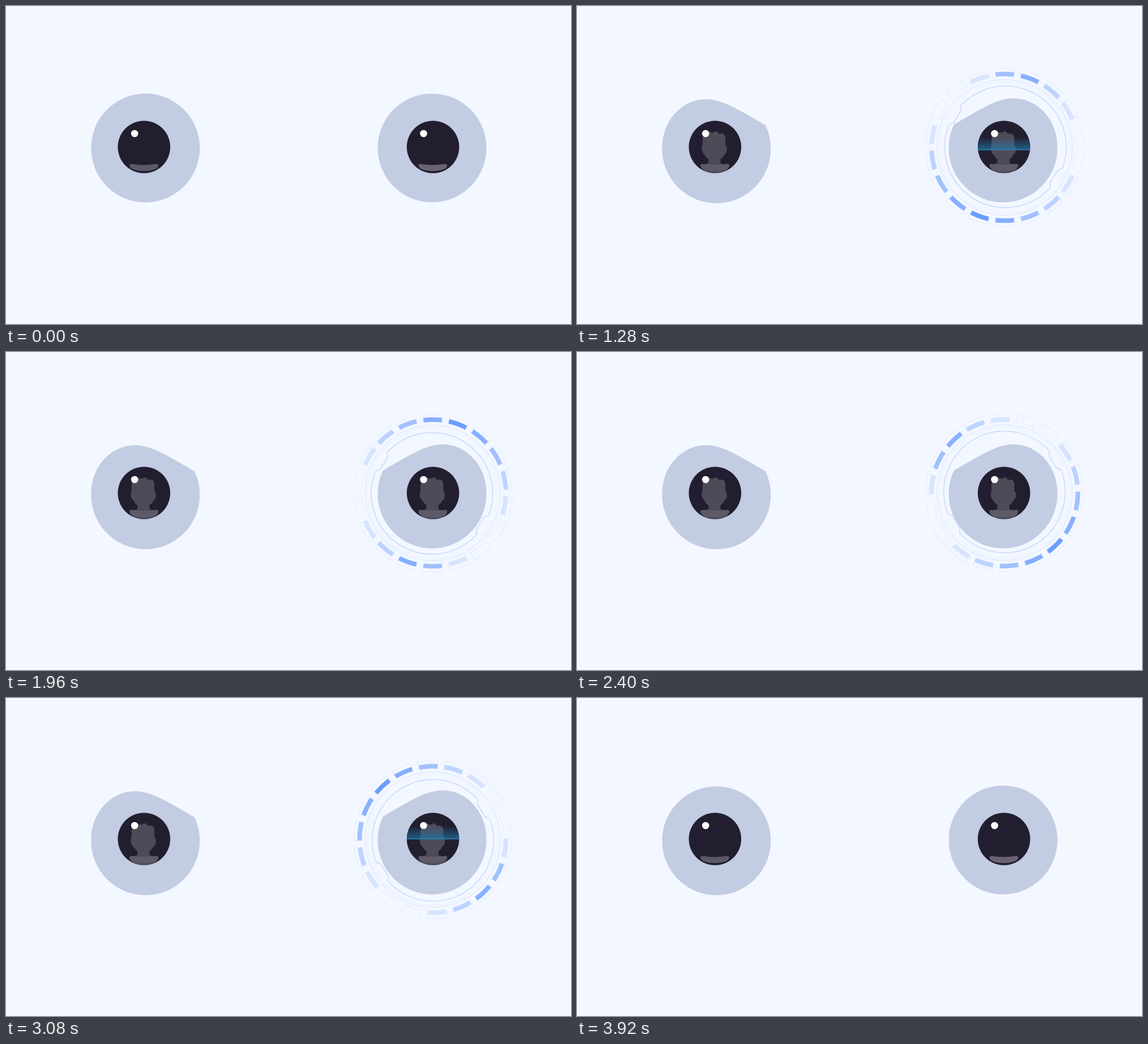
An HTML page with a canvas that plays this animation: 998 by 561 pixels, repeating every 4000 ms.

```html
<!DOCTYPE html>
<html lang="en">
<head>
<meta charset="utf-8">
<title>Eye scan</title>
<style>
  html, body { margin: 0; width: 100%; height: 100%; overflow: hidden; background: #f3f7ff; }
  canvas { display: block; }
</style>
</head>
<body>
<canvas id="stage" width="998" height="561"></canvas>
<script>
const ctx = document.getElementById('stage').getContext('2d');
const LOOP = 4000, STEP = 40, TAU = Math.PI * 2;
const rad = deg => deg * Math.PI / 180;
const mix = (a, b, k) => a + (b - a) * k;
const ramp = (t, from, to) => Math.min(1, Math.max(0, (t - from) / (to - from)));
const smooth = k => k * k * (3 - 2 * k);
// Rises over [a, b] and falls over [c, d].
const window4 = (t, a, b, c, d) => ramp(t, a, b) * (1 - ramp(t, c, d));

const crescent = new Path2D('M-22 30Q0 33.5 21 30Q25 29.5 25 32.5Q25 36 21 38.5Q12 42.5 0 42.5Q-14 42.5-21 38.5Q-25.5 36-25.5 32.5Q-25.5 29.5-22 30Z');
const head = new Path2D(
  'M-20-24Q-12-28-4-25Q0-29 4-27L7-23Q12-25 16-22L18-18L18.500-2' +
  'Q21.500-2 21 4Q20.500 12 16 14Q14 19 9.500 21.500V27Q10 30 16 30.500L23 30' +
  'Q25.500 31 25 34Q20 47 0 47Q-20 47-25.500 34Q-25.500 30-22 30.500' +
  'Q-12 30-11.500 27V21.500Q-16 19-18 14Q-23 10-23.500 2Q-23.500-2-22-2V-14Z');

function disc(x, y, r, color) {
  ctx.fillStyle = color;
  ctx.beginPath();
  ctx.arc(x, y, r, 0, TAU);
  ctx.fill();
}

function eyeball(x, y, flip, lid) {
  const m = (a, b) => mix(a, b, lid);
  ctx.save();
  ctx.translate(x, y);
  ctx.scale(flip, 1);
  ctx.fillStyle = ctx.strokeStyle = '#c2cce3';
  ctx.lineWidth = 6;
  ctx.lineJoin = 'round';
  ctx.beginPath();
  ctx.arc(0, 0, 93, 0, rad(205));
  ctx.bezierCurveTo(m(-69, -53), m(-72, -56.5), m(-36.1, -12), m(-93, -86), m(0, 20), m(-93, -84.5));
  ctx.bezierCurveTo(m(51.4, 56), m(-93, -84.5), 93, -51.4, 93, 0);
  ctx.closePath();
  ctx.fill();
  ctx.stroke();
  ctx.restore();
}

function pupil(x, shine, face, scanY) {
  ctx.save();
  ctx.translate(x, 248.8);
  disc(0, 0, 46.3, '#221e2f');
  ctx.fillStyle = shine;
  ctx.fill(crescent);
  disc(-16.6, -23.8, 6.3, '#fff');
  ctx.beginPath();
  ctx.arc(0, 0, 46.3, 0, TAU);
  ctx.clip();
  ctx.fillStyle = `rgba(255,255,255,${0.2 * face})`;
  // The shoulders must not brighten the crescent twice.
  ctx.fill(head);
  if (face > 0) {
    ctx.globalAlpha = face;
    ctx.fillStyle = '#5c5968';
    ctx.fill(crescent);
    ctx.globalAlpha = 1;
  }
  if (scanY !== null) {
    const glow = ctx.createLinearGradient(0, scanY - 23, 0, scanY);
    glow.addColorStop(0, 'rgba(30,125,175,0)');
    glow.addColorStop(1, 'rgba(30,125,175,.68)');
    ctx.fillStyle = glow;
    ctx.fillRect(-47, scanY - 23, 94, 23);
    ctx.fillStyle = '#2c82b0';
    ctx.fillRect(-47, scanY - 1, 94, 1.5);
  }
  ctx.restore();
}

function ring(r, color, width, from = 0, to = 360) {
  ctx.strokeStyle = color;
  ctx.lineWidth = width;
  ctx.beginPath();
  ctx.arc(0, 0, r, rad(from), rad(to));
  ctx.stroke();
}

function block(inner, outer, half) {
  ctx.beginPath();
  ctx.arc(0, 0, outer, -half, half);
  ctx.arc(0, 0, inner, half, -half, true);
  ctx.closePath();
}

function notchedRing() {
  ctx.beginPath();
  for (const mid of [31.8, 211.8]) {
    for (const d of [-7, 7]) {
      const a = rad(mid + d);
      if (d < 0) ctx.arc(0, 0, 107.3, rad(mid - 169.3), rad(mid - 10.7));
      ctx.lineTo(101 * Math.cos(a), 101 * Math.sin(a));
    }
  }
  ctx.closePath();
  ctx.strokeStyle = '#c9d9ff';
  ctx.lineWidth = 1.5;
  ctx.stroke();
}

// Fill strength of the 18 blocks, in fifths, clockwise from the brightest.
const levels = [5, 4, 3, 2, 1, 0, 0, 1, 3, 4, 2, 1, 0, 0, 1, 2, 3, 4];

function dial(turn, alpha) {
  ctx.save();
  ctx.globalAlpha = alpha;
  ctx.translate(754.6, 249);
  ctx.rotate(turn);

  ctx.save();
  ctx.translate(-2.2, 0.5);
  notchedRing();
  ctx.restore();

  ctx.translate(-0.95, -0.35);
  ring(119.5, '#e2ebff', 1.6);
  ring(115.5, '#ecf2ff', 1);
  ring(143, '#e9f0ff', 1, 0, 35);
  levels.forEach((level, i) => {
    ctx.save();
    ctx.rotate(rad(290 + i * 20));
    block(125.5, 139.6, rad(7.4));
    ctx.strokeStyle = '#e4ecfd';
    ctx.lineWidth = 1;
    ctx.stroke();
    block(125.5, 133.4, rad(7.2));
    ctx.fillStyle = `rgba(107,157,255,${level / 5})`;
    ctx.fill();
    ctx.restore();
  });
  ctx.restore();
}

function draw(t) {
  const lid = smooth(window4(t, 200, 600, 3560, 3920));
  const face = window4(t, 200, 720, 3560, 3880);
  const hud = window4(t, 200, 820, 3520, 3920);
  const pass = [880, 2720].find(start => t >= start && t < start + 720);
  const scanY = pass === undefined ? null : mix(-46, 46, (t - pass) / 720);

  ctx.fillStyle = '#f3f7ff';
  ctx.fillRect(0, 0, 998, 561);
  dial((t - 1960) / 1360 * TAU, hud);
  eyeball(246.3, mix(250.6, 251.9, ramp(t, 200, 600)), -1, lid);
  eyeball(752.6, 250.4, 1, lid);
  pupil(243.8, '#5b5967', face, null);
  pupil(754.2, '#686272', face, scanY);
}

function tick() {
  const t = performance.now() % LOOP;
  draw(Math.floor(t / STEP) * STEP);
  requestAnimationFrame(tick);
}
tick();
</script>
</body>
</html>
```
